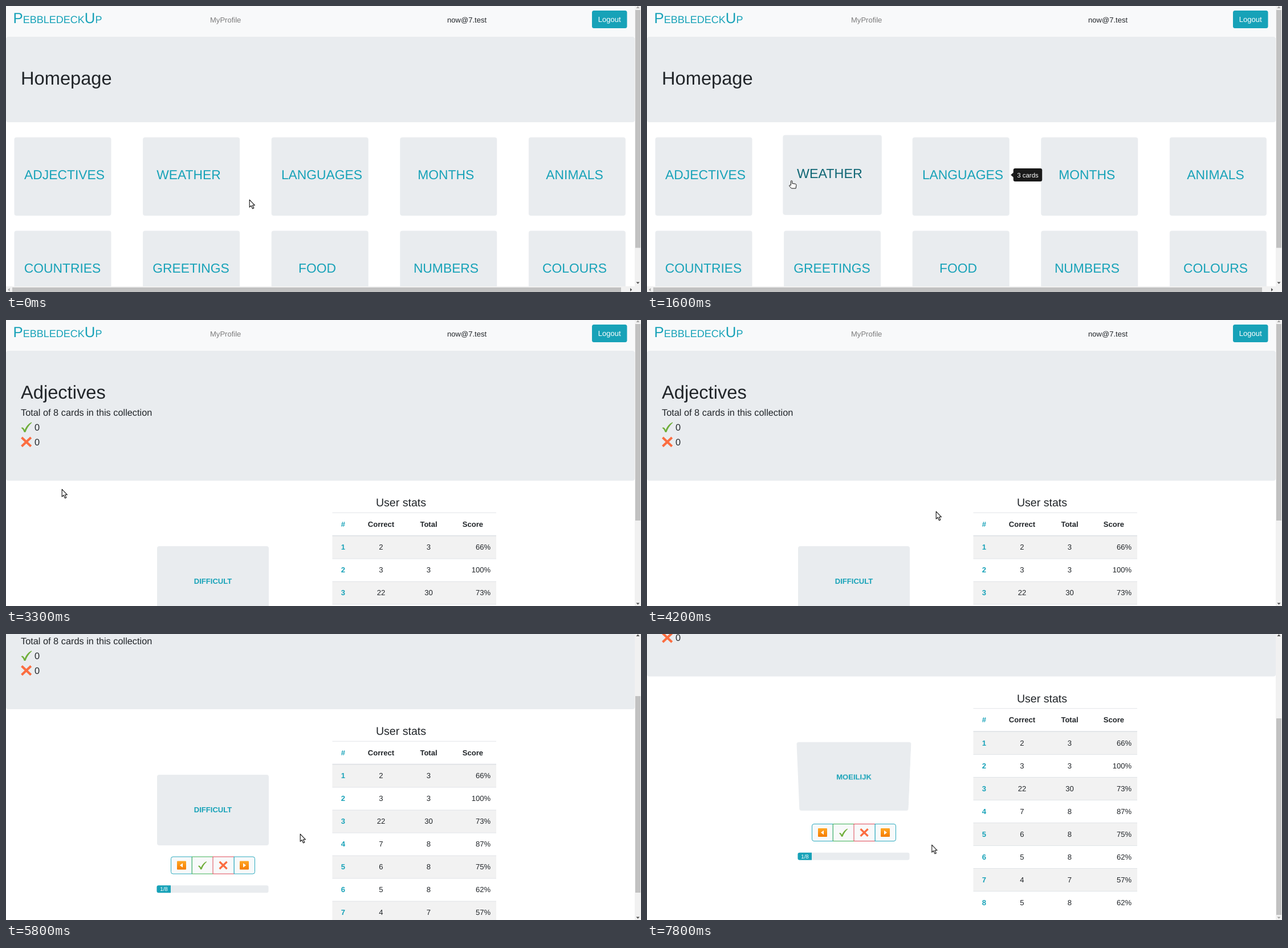
An HTML page for the animation above (8000 ms loop, 1114 px wide and 502 px high).

```html
<!DOCTYPE html>
<html lang="en">
<head>
<meta charset="utf-8">
<title>Flashcards</title>
<style>
@property --scroll { syntax: "<number>"; inherits: true; initial-value: 0; }
@property --hand { syntax: "<number>"; inherits: true; initial-value: 0; }
@property --lift { syntax: "<number>"; inherits: true; initial-value: 0; }
@property --tip { syntax: "<number>"; inherits: true; initial-value: 0; }

html, body { margin: 0; width: 100%; height: 100%; overflow: hidden; background: #fff; }
body { font: 13.06px "Liberation Sans", Arial, sans-serif; }
#stage { position: relative; width: 1114px; height: 502px; overflow: hidden; }
#page, #stage svg { position: absolute; left: 0; top: 0; display: block; }
svg text { fill: #212529; text-rendering: geometricPrecision; white-space: pre; }

/* one loop is 8 s, so 1.25% is one 100 ms tick */
#stage { animation: scroll 8s step-end infinite; }
#page { transform: translateY(calc(var(--scroll) * -1px)); }
#thumb { transform: translateY(calc(var(--scroll) * .68px)); }
.home { animation: home 8s step-end infinite; }
.detail { animation: detail 8s step-end infinite; }
#up { animation: up 8s step-end infinite; }
#down { animation: down 8s step-end infinite; }
#status { animation: status 8s step-end infinite; }
#cursor { animation: move 8s step-end infinite, hand 8s step-end infinite; }
#arrow { opacity: calc(1 - var(--hand)); }
#finger { opacity: var(--hand); }

.h1 { font-size: 32.64px; }
.lead { font-size: 16.32px; }
.mid { text-anchor: middle; }
.end { text-anchor: end; }
.bold { font-weight: bold; }
svg .teal { fill: #17a2b8; }
svg .white { fill: #fff; }
.logo { font-size: 25.8px; font-variant: small-caps; }
.grey { fill: #e9ecef; }
.track { fill: #f1f1f1; }
.bar { fill: #c1c1c1; }
.on { fill: #505050; }
.off { fill: #a3a3a3; }

.lift {
  transform-box: fill-box; transform-origin: center;
  transform: translateY(calc(var(--lift) * -2.7px)) scale(calc(1 + var(--lift) * .02));
}
.lift text {
  font-size: 22.85px;
  fill: color-mix(in srgb, #0f6674 calc(var(--lift) * 100%), #17a2b8);
}
.tip { opacity: var(--tip); }
.tip text { font-size: 11.43px; fill: #fff; }

.flip { position: absolute; left: 264.5px; top: 397px; width: 196px; height: 124px; perspective: 580px; }
.turn { width: 100%; height: 100%; transform-style: preserve-3d; animation: turn 8s step-end infinite; }
.turn b {
  position: absolute; inset: 0; display: flex; align-items: center; justify-content: center;
  padding-bottom: 1.5px; background: #e9ecef; border-radius: 4px; color: #17a2b8;
  box-sizing: border-box; backface-visibility: hidden;
}
.turn .back { transform: rotateX(180deg); }

@keyframes home { 0% { visibility: visible } 41.25%, 100% { visibility: hidden } }
@keyframes detail { 0% { visibility: hidden } 41.25%, 100% { visibility: visible } }
@keyframes scroll {
  0% { --scroll: 0 } 68.75% { --scroll: 27.7 } 72.5% { --scroll: 150 } 75%, 100% { --scroll: 207.5 }
}
@keyframes up { 0% { fill: #a3a3a3 } 68.75%, 100% { fill: #505050 } }
@keyframes down { 0% { fill: #505050 } 75%, 100% { fill: #a3a3a3 } }
@keyframes status { 0% { opacity: 0 } 30% { opacity: .5 } 31.25% { opacity: 1 } 41.25%, 100% { opacity: 0 } }

@keyframes move {
  0% { transform: translate(427px, 340px) }
  2.5% { transform: translate(427px, 340px); animation-timing-function: steps(4) }
  7.5% { transform: translate(520px, 420px); animation-timing-function: steps(3) }
  11.25% { transform: translate(580px, 400px); animation-timing-function: steps(2) }
  13.75% { transform: translate(575px, 320px); animation-timing-function: steps(2) }
  16.25% { transform: translate(500px, 310px); animation-timing-function: steps(3) }
  20% { transform: translate(249px, 306px); animation-timing-function: steps(4) }
  25% { transform: translate(100px, 302px); animation-timing-function: steps(2) }
  27.5% { transform: translate(98px, 297px) }
  41.25% { transform: translate(98px, 297px); animation-timing-function: steps(3) }
  45% { transform: translate(264px, 293px) }
  47.5% { transform: translate(350px, 415px) }
  50% { transform: translate(503px, 312px) }
  52.5% { transform: translate(507px, 336px) }
  55% { transform: translate(480px, 355px) }
  56.25% { transform: translate(459px, 367px) }
  60% { transform: translate(435px, 371px) }
  61.25% { transform: translate(467px, 346px) }
  63.75% { transform: translate(515px, 346px) }
  66.25% { transform: translate(514.5px, 345.5px) }
  68.75% { transform: translate(516px, 351px) }
  77.5% { transform: translate(482px, 310px) }
  81.25% { transform: translate(357px, 276px) }
  96.25% { transform: translate(420px, 320px) }
  97.5%, 100% { transform: translate(499.5px, 370px) }
}
@keyframes hand {
  0% { --hand: 0 } 6.25% { --hand: 1 } 17.5% { --hand: 0 } 18.75% { --hand: 1 }
  21.25% { --hand: 0 } 22.5% { --hand: 1 } 41.25%, 100% { --hand: 0 }
}
@keyframes turn {
  0% { transform: rotateX(0deg) }
  50% { transform: rotateX(-20deg) }
  52.5% { transform: rotateX(0deg) }
  81.25% { transform: rotateX(33.6deg) }
  85% { transform: rotateX(124deg) }
  87.5% { transform: rotateX(152.5deg) }
  90% { transform: rotateX(173deg) }
  91.25% { transform: rotateX(180deg) }
  96.25% { transform: rotateX(176deg) }
  97.5%, 100% { transform: rotateX(166deg) }
}

/* hover and tooltip of each visited card */
@keyframes food {
  0% { --lift: 0; --tip: 0 } 6.25% { --lift: .5; --tip: 0 } 7.5% { --lift: 1; --tip: 0 }
  8.75% { --lift: 1; --tip: .5 } 10% { --lift: 1; --tip: 1 } 12.5% { --lift: .4; --tip: 1 }
  13.75% { --lift: 0; --tip: 1 } 15% { --lift: 0; --tip: .5 } 16.25%, 100% { --lift: 0; --tip: 0 }
}
@keyframes languages {
  0% { --lift: 0; --tip: 0 } 12.5% { --lift: .7; --tip: 0 } 13.75% { --lift: 1; --tip: 0 }
  15% { --lift: 1; --tip: .5 } 16.25% { --lift: 1; --tip: 1 } 17.5% { --lift: .4; --tip: 1 }
  18.75% { --lift: 0; --tip: 1 } 21.25% { --lift: 0; --tip: .5 } 22.5%, 100% { --lift: 0; --tip: 0 }
}
@keyframes weather {
  0% { --lift: 0; --tip: 0 } 18.75% { --lift: .6; --tip: 0 } 20% { --lift: 1; --tip: 0 }
  21.25% { --lift: .4; --tip: 0 } 22.5% { --lift: 0; --tip: .5 } 23.75% { --lift: 0; --tip: 1 }
  26.25% { --lift: 0; --tip: .5 } 27.5%, 100% { --lift: 0; --tip: 0 }
}
@keyframes adjectives {
  0% { --lift: 0; --tip: 0 } 22.5% { --lift: .6; --tip: 0 } 23.75% { --lift: 1; --tip: 0 }
  26.25% { --lift: 1; --tip: .5 } 27.5% { --lift: 1; --tip: 1 } 41.25%, 100% { --lift: 0; --tip: 0 }
}
</style>
</head>
<body>
<div id="stage">
  <div id="page">
    <svg width="1103" height="720">
      <defs>
        <linearGradient id="amber" x2="0" y2="1">
          <stop stop-color="#ffa726"/><stop offset="1" stop-color="#f57c00"/>
        </linearGradient>
        <path id="check" fill="#6fae3a" d="M.5 10.5q2-1.8 3.5-.6 1.6 1 2.5 4Q11 4 18.5.4q1 0 .8.9Q12 8 8.5 17.4q-1.5 1-3 0Q4 12.5.5 10.5z"/>
        <path id="cross" fill="none" stroke="#fb6d40" stroke-width="4" d="M1.5 1.2 17.8 16.8M17.8 1.2 1.5 16.8"/>
        <g id="prev">
          <rect x="-8" y="-7.5" width="16" height="15" rx="1" fill="url(#amber)"/>
          <path d="M-3 0 2-3.7V3.7z" fill="#fff"/>
        </g>
      </defs>

      <rect width="1103" height="54" fill="#f8f9fa"/>
      <text class="logo teal" x="12.5" y="30">PebbledeckUp</text>
      <text x="358" y="28.5" style="fill:#7c7c7d">MyProfile</text>
      <text x="774" y="28.5">now@7.test</text>
      <rect class="teal" x="1028" y="8" width="61.5" height="31" rx="3.5"/>
      <text class="mid white" x="1058.7" y="28">Logout</text>

      <g class="home">
        <rect class="grey" y="54" width="1103" height="150" rx="4"/>
        <text class="h1" x="26" y="137.5">Homepage</text>
        <g id="cards"></g>
      </g>

      <g class="detail">
        <rect class="grey" y="54" width="1103" height="228" rx="4"/>
        <text class="h1" x="26" y="137.5">Adjectives</text>
        <text class="lead" x="26" y="167.5">Total of 8 cards in this collection</text>
        <use href="#check" x="26" y="179"/>
        <text class="lead" x="50" y="193.7">0</text>
        <use href="#cross" x="26" y="205"/>
        <text class="lead" x="50" y="219.7">0</text>

        <text class="mid" x="693" y="327" style="font-size:19.59px">User stats</text>
        <g id="table"></g>

        <g fill="#f8f9fa" stroke-width=".9">
          <path stroke="#17a2b8" d="M326.3 541h-33.3q-3.5 0-3.5 3.5v23q0 3.5 3.5 3.5h33.3z"/>
          <path stroke="#17a2b8" d="M400 541h33q3.5 0 3.5 3.5v23q0 3.5-3.5 3.5h-33z"/>
          <path stroke="#28a745" d="M363 541h-36.7v30H363"/>
          <path stroke="#dc3545" d="M400 541h-37v30h37"/>
          <path stroke="#17a2b8" d="M400 541v30"/>
        </g>
        <use href="#prev" x="308" y="556"/>
        <use href="#check" transform="translate(336.6 549) scale(.8)"/>
        <use href="#cross" transform="translate(373.4 548.8) scale(.8)"/>
        <use href="#prev" transform="translate(418 556) scale(-1 1)"/>

        <rect class="grey" x="264.5" y="591.3" width="196" height="13" rx="3.3"/>
        <path class="teal" d="M289 591.3h-21.2q-3.3 0-3.3 3.3v6.4q0 3.3 3.3 3.3H289z"/>
        <text class="mid white" x="277" y="601.3" style="font-size:9.79px">1/8</text>
      </g>
    </svg>
    <div class="flip detail">
      <div class="turn"><b>DIFFICULT</b><b class="back">MOEILIJK</b></div>
    </div>
  </div>

  <svg width="1114" height="502">
    <rect class="track" x="1103" width="11" height="502"/>
    <path id="up" d="M1105.5 4h6l-3-3.5z"/>
    <g class="home">
      <rect class="bar" x="1104" y="7" width="9" height="417.5"/>
      <path class="on" d="M1105.5 484.5h6l-3 3.3z"/>
      <rect class="track" y="492" width="1114" height="10"/>
      <rect class="bar" x="11" y="494" width="1068" height="8"/>
      <path class="off" d="M6.5 495v6l-3.3-3z"/>
      <path class="on" d="M1095 495v6l3.3-3z"/>
    </g>
    <g class="detail">
      <rect id="thumb" class="bar" x="1104" y="7" width="9" height="345"/>
      <path id="down" d="M1105.5 496.5h6l-3 3.3z"/>
    </g>
    <g id="status">
      <path d="M-1 486.5H138q2.5 0 2.5 2.5V503H-1z" fill="#dee1e6" stroke="#bfc2c6" stroke-width=".8"/>
      <text x="3" y="498.3" style="font:9.79px 'Noto Sans',sans-serif;fill:#45484c">localhost:3000/collections/10</text>
    </g>
  </svg>

  <svg id="cursor" width="20" height="22" overflow="visible" fill="#fff" stroke="#111" stroke-linejoin="round">
    <path id="arrow" stroke-width="1.1" d="M.2.2V13.2L3.2 10.5 5.5 15.8 7.8 14.8 5.5 9.8H9.5z"/>
    <path id="finger" d="M3.4 8.6V1.8a1.2 1.2 0 0 1 2.4 0V5.5l5.4.7q1.9.4 1.7 2.3l-.8 5.6H4.4L.7 10q-.3-1.6 1-1.6z"/>
  </svg>
</div>

<script>
// word, text centre, card count if its tooltip appears
const cards = [
  ["ADJECTIVES", 102.5, 8], ["WEATHER", 320.5, 6], ["LANGUAGES", 554, 3], ["MONTHS", 771.8], ["ANIMALS", 997.5],
  ["COUNTRIES", 99], ["GREETINGS", 324.5], ["FOOD", 546, 5], ["NUMBERS", 772], ["COLOURS", 997.5]
];

function card([word, cx, count], i) {
  const x = 14.5 + 225.6 * (i % 5), y = i < 5 ? 230.5 : 394.5;
  const right = x + 170, mid = y + 66;
  const tip = count ? `<g class="tip" fill="#1a1a1a">
    <path d="M${right + 2.5} ${mid}l4.7-4.2v8.4z"/>
    <rect x="${right + 7}" y="${mid - 11.5}" width="50.5" height="23" rx="3.3"/>
    <text class="mid" x="${right + 32.3}" y="${mid + 4}">${count} cards</text></g>` : "";
  const run = count ? `style="animation:${word.toLowerCase()} 8s step-end infinite"` : "";
  return `<g ${run}><g class="lift">
    <rect class="grey" x="${x}" y="${y}" width="170" height="137.5" rx="4"/>
    <text class="mid" x="${cx}" y="${y + 73.7}">${word}</text></g>${tip}</g>`;
}

// right-hand cards first, so tooltips lie over their neighbours
document.getElementById("cards").innerHTML = cards.map(card).reverse().join("");

const scores = [[2, 3], [3, 3], [22, 30], [7, 8], [6, 8], [5, 8], [4, 7], [5, 8]];
const cell = (x, y, value, cls) => `<text class="${cls}" x="${x}" y="${y}">${value}</text>`;
const line = (y, h) => `<rect x="572.5" y="${y}" width="287.5" height="${h}" fill="#dee2e6"/>`;

function row([correct, total], i) {
  const top = 379 + 40 * i, y = top + 24.2;
  const stripe = i % 2 ? "" : `<rect x="572.5" y="${top}" width="287.5" height="40" fill="#f2f2f2"/>`;
  return stripe + (i ? line(top - .4, .9) : line(top - 1.2, 1.7)) +
    cell(591.5, y, i + 1, "mid bold teal") + cell(658, y, correct, "mid") +
    cell(741.5, y, total, "mid") + cell(850, y, Math.floor(100 * correct / total) + "%", "end");
}

document.getElementById("table").innerHTML = line(337.8, .9) +
  cell(591.5, 362.5, "#", "mid bold teal") + cell(658, 362.5, "Correct", "mid bold") +
  cell(741.5, 362.5, "Total", "mid bold") + cell(819, 362.5, "Score", "mid bold") +
  scores.map(row).join("");
</script>
</body>
</html>
```
